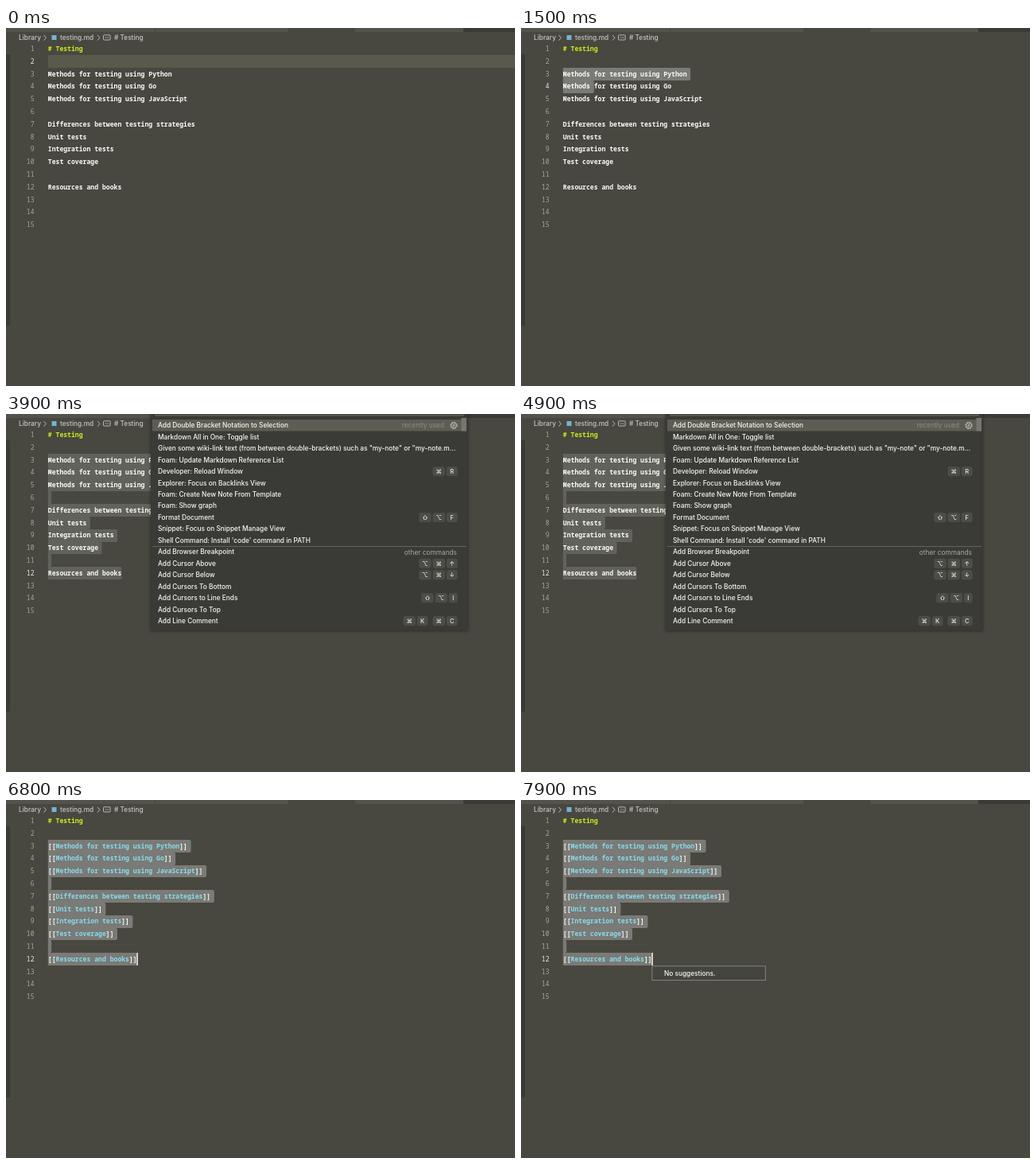
These frames come from a looping animation (640x450 px, 8 s). An HTML page:

```html
<!DOCTYPE html>
<html lang="en">
<head>
<meta charset="utf-8">
<title>Wiki link command</title>
<style>
html, body { margin: 0; width: 100%; height: 100%; overflow: hidden; background: #484740; }
svg { display: block; width: 640px; height: 450px; }
text { white-space: pre; }
.ui { font: 500 8.3px Inter, sans-serif; fill: #f8f8f2; }
.crumb { fill: #c6c6c0; }
.code { font: 600 8.12px "Noto Sans Mono", monospace; fill: #fbfbf6; }
.head { font-weight: 800; fill: #cdee18; }
.link { fill: #86dcec; }
.num { fill: #a6a69f; font-weight: 500; text-anchor: end; }
.num.on { fill: #e8e8e2; }
.right { font-weight: 400; text-anchor: end; }
.key { font: 500 7.6px Inter, "DejaVu Sans", sans-serif; fill: #eaeae4; text-anchor: middle; }
.icon { fill: none; stroke: #c6c6c0; stroke-width: .9; }
#palette { filter: drop-shadow(0 1px 2px rgba(0, 0, 0, .4)); }
</style>
</head>
<body>
<svg id="stage" viewBox="0 0 640 450"></svg>
<script>
const NS = "http://www.w3.org/2000/svg";
const stage = document.getElementById("stage");
const LOOP = 8000, LEFT = 52.8, CHAR = 4.872, LINE = 15.79, TOP = 18.4, ROW = 14.46;

const lines = [
  "# Testing", "",
  "Methods for testing using Python",
  "Methods for testing using Go",
  "Methods for testing using JavaScript", "",
  "Differences between testing strategies",
  "Unit tests", "Integration tests", "Test coverage", "",
  "Resources and books", "", "", ""
];

const commands = [
  ["Add Double Bracket Notation to Selection"],
  ["Markdown All in One: Toggle list"],
  ['Given some wiki-link text (from between double-brackets) such as "my-note" or "my-note.m...'],
  ["Foam: Update Markdown Reference List"],
  ["Developer: Reload Window", "⌘ R"],
  ["Explorer: Focus on Backlinks View"],
  ["Foam: Create New Note From Template"],
  ["Foam: Show graph"],
  ["Format Document", "⇧ ⌥ F"],
  ["Snippet: Focus on Snippet Manage View"],
  ["Shell Command: Install 'code' command in PATH"],
  ["Add Browser Breakpoint"],
  ["Add Cursor Above", "⌥ ⌘ ↑"],
  ["Add Cursor Below", "⌥ ⌘ ↓"],
  ["Add Cursors To Bottom"],
  ["Add Cursors to Line Ends", "⇧ ⌥ I"],
  ["Add Cursors To Top"],
  ["Add Line Comment", "⌘ K  ⌘ C"]
];

// Each step changes only the listed properties.
const steps = [
  { at: 0, line: 2, col: 0, select: false, caret: false, palette: false, hover: false, linked: false, hint: false },
  { at: 100, line: 3, caret: true },
  { at: 300, col: 12, select: true },
  { at: 700, line: 4, col: 4 },
  { at: 1100, col: 8 },
  { at: 1500, caret: false },
  { at: 2000, line: 12, col: 19, caret: true },
  { at: 2500, caret: false },
  { at: 3000, caret: true },
  { at: 3500, caret: false },
  { at: 3800, palette: true },
  { at: 5300, hover: true },
  { at: 6800, palette: false, hover: false, linked: true, col: 23, caret: true },
  { at: 7200, hint: true }
];

function add(parent, tag, attrs = {}, text = "") {
  const el = document.createElementNS(NS, tag);
  for (const k in attrs) el.setAttribute(k, attrs[k]);
  el.textContent = text;
  parent.append(el);
  return el;
}
const group = (parent, id) => add(parent, "g", { id });
const box = (parent, x, y, width, height, fill, more) =>
  add(parent, "rect", { x, y, width, height, fill, ...more });
const label = (parent, x, y, text, cls) => add(parent, "text", { x, y, class: cls }, text);
const lineTop = n => Math.round(TOP + LINE * (n - 1));
const baseline = n => TOP + LINE * (n - 1) + 10.7;
const show = (el, on) => el.setAttribute("visibility", on ? "visible" : "hidden");

function drawFrame() {
  box(stage, 0, 0, 640, 450, "#484740");
  box(stage, 0, 0, 187, 5, "#54534b");
  box(stage, 188, 0, 167, 5, "#54534b");
  box(stage, 439, 0, 136, 5, "#54534b");
  box(stage, 575, 0, 65, 5, "#3a3a36");
  box(stage, 0, 33, 5, 341, "#3a3a36");
}

function drawCrumbs() {
  label(stage, 16, 15, "Library", "ui crumb");
  label(stage, 68, 15, "testing.md", "ui crumb");
  label(stage, 136, 15, "# Testing", "ui crumb");
  for (const x of [47.5, 115]) add(stage, "path", { d: `M${x} 9l3 3.3-3 3.3`, class: "icon" });
  box(stage, 57.5, 9, 6, 6, "#72b5d0");
  box(stage, 122.5, 8.8, 8.6, 6.2, "none", { rx: 1, class: "icon" });
  add(stage, "path", { d: "M124.5 12h4.8", class: "icon", "stroke-dasharray": "1.2 .6" });
}

function drawText(parent, linked) {
  lines.forEach((text, i) => {
    if (!text) return;
    const el = label(parent, LEFT, baseline(i + 1), "", i ? "code" : "code head");
    if (linked && i) {
      add(el, "tspan", {}, "[[");
      add(el, "tspan", { class: "link" }, text);
      add(el, "tspan", {}, "]]");
    } else el.textContent = text;
  });
}

function drawGear(parent, y) {
  const g = add(parent, "g", { fill: "none", stroke: "#d4d4ce" });
  add(g, "circle", { cx: 563, cy: y, r: 3.4, "stroke-width": .8 });
  add(g, "circle", { cx: 563, cy: y, r: 4.2, "stroke-width": .9, "stroke-dasharray": "1.6 1.7" });
  add(g, "circle", { cx: 563, cy: y, r: 1.2, "stroke-width": .8 });
}

// Shortcut keys run leftward from the right edge.
function drawKeys(parent, keys, y) {
  let x = 567.3;
  for (const key of keys.split(" ").reverse()) {
    if (!key) { x -= 4; continue; }
    const w = key === "I" ? 10 : /[A-Z↑↓]/.test(key) ? 13 : 14.5;
    x -= w;
    box(parent, x, y - 5.6, w, 11.2, "#4d4d47", { rx: 2, stroke: "#55554f", "stroke-width": .6 });
    label(parent, x + w / 2, y + 2.7, key, "key");
    x -= 2.8;
  }
}

function drawPalette() {
  const p = group(stage, "palette");
  box(p, 182, -5, 398.5, 277, "#3a3a36");
  box(p, 188, -3, 387, 5, "#484740", { stroke: "#77766d", "stroke-width": .8 });
  const focus = box(p, 184, 7, 395, 14.5, "#5e5d54");
  const hover = group(p, "hover");
  box(hover, 184, 93.8, 395, 14.4, "#5b5a4e");
  box(p, 572.5, 5, 6.5, 16.5, "#77766f");
  drawGear(hover, 101);
  drawGear(p, 14.4);
  box(p, 184, 166, 395, .9, "#68675f");
  commands.forEach(([text, keys], i) => {
    const y = 14.3 + ROW * i;
    label(p, 191, y + 2.9, text, "ui");
    if (keys) drawKeys(p, keys, y);
  });
  label(p, 551, 17.2, "recently used", "ui right").style.fill = "#8d8c85";
  label(p, 567, 176.9, "other commands", "ui right").style.fill = "#aaa9a2";
  return { p, focus, hover };
}

function drawHint() {
  const g = group(stage, "hint");
  box(g, 164.9, 208.8, 142.4, 17.8, "#454540", { stroke: "#8b8a83", "stroke-width": .9 });
  label(g, 180, 220.8, "No suggestions.", "ui");
  return g;
}

function selectionPath(s) {
  let d = "";
  for (let n = 3; n <= s.line; n++) {
    const extra = s.linked && lines[n - 1] ? 4 : 0;
    const cols = n === s.line ? s.col : lines[n - 1].length + extra + 0.9;
    const y = lineTop(n), h = lineTop(n + 1) - y;
    d += `M${LEFT} ${y}h${cols * CHAR - 2}q2 0 2 2v${h - 4}q0 2-2 2H${LEFT}z`;
  }
  return d;
}

drawFrame();
const current = box(stage, LEFT, 0, 590, 16, "#5a594b");
const selection = add(stage, "path");
drawCrumbs();
const numbers = lines.map((_, i) => label(stage, 35.5, baseline(i + 1), i + 1, "code num"));
const plain = group(stage, "plain"), linked = group(stage, "linked");
drawText(plain, false);
drawText(linked, true);
const caret = box(stage, 0, 0, 1.4, 16, "#ffffff");
const pal = drawPalette();
const hint = drawHint();

function render(s) {
  numbers.forEach((el, i) => el.classList.toggle("on", i + 1 === s.line));
  current.setAttribute("y", lineTop(s.line));
  show(current, !s.select);
  selection.setAttribute("d", s.select ? selectionPath(s) : "");
  selection.setAttribute("fill", s.palette ? "#62625c" : "#7a7a76");
  caret.setAttribute("x", LEFT + s.col * CHAR - .5);
  caret.setAttribute("y", lineTop(s.line));
  show(caret, s.caret);
  show(plain, !s.linked);
  show(linked, s.linked);
  show(pal.p, s.palette);
  show(pal.hover, s.palette && s.hover);
  pal.focus.setAttribute("fill", s.hover ? "#59584f" : "#5e5d54");
  show(hint, s.hint);
}

const start = performance.now();
let shown = -1;
function tick() {
  const t = (performance.now() - start) % LOOP;
  const past = steps.filter(s => s.at <= t);
  if (past.length !== shown) {
    shown = past.length;
    render(Object.assign({}, ...past));
  }
  requestAnimationFrame(tick);
}
tick();
</script>
</body>
</html>
```
